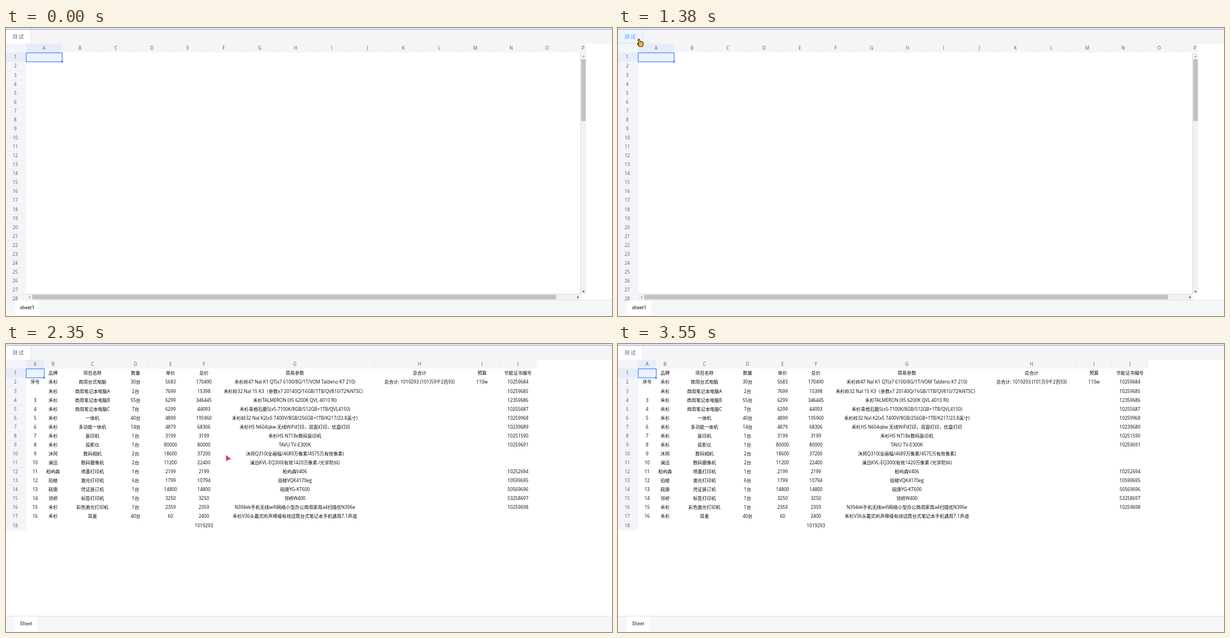
Recreate the animation shown at these times as an HTML page. Size 1084 by 517 pixels, loop 3990 ms.

```html
<!DOCTYPE html>
<html lang="zh-CN">
<head>
<meta charset="utf-8">
<title>Spreadsheet</title>
<style>
  html, body { margin: 0; width: 100%; height: 100%; overflow: hidden; background: #fff; }
  svg { display: block; width: 1084px; height: 517px; }
  text { font: 8.2px "Open Sans", "Noto Sans", "Noto Sans CJK SC", "Noto Sans CJK", sans-serif; fill: #0a0a0a; text-anchor: middle; }
  .head text { fill: #585757; }
  .tab { font: 700 8.4px Roboto, sans-serif; fill: #585757; text-anchor: start; }
  .btn { font: 500 9px "Noto Sans CJK SC", "Noto Sans CJK", sans-serif; fill: #606266; }
  .on .btn { fill: #409eff; }
  .crisp { shape-rendering: crispEdges; }

  .blank, .table, .on, .arrow, .hand, .grip { animation: 3990ms step-end infinite; }
  .blank { animation-name: blank; }
  .table { animation-name: table; }
  .on { animation-name: hover; }
  .arrow { animation-name: arrow; }
  .hand { animation-name: hand; }
  .grip { animation-name: grip; }
  .cursor { animation: move 3990ms linear infinite; }

  @keyframes blank { 0% { opacity: 1 } 45.11%, 100% { opacity: 0 } }
  @keyframes table { 0% { opacity: 0 } 45.11%, 100% { opacity: 1 } }
  @keyframes hover { 0% { opacity: 0 } 29.3% { opacity: 1 } 47.1%, 100% { opacity: 0 } }
  @keyframes hand { 0% { opacity: 0 } 29.3% { opacity: 1 } 47.1%, 100% { opacity: 0 } }
  @keyframes arrow {
    0% { opacity: 0 } 1.25% { opacity: 1 } 29.3% { opacity: 0 }
    47.1% { opacity: 1 } 88.97%, 100% { opacity: 0 }
  }
  @keyframes grip {
    0% { opacity: 0 } 27.3% { opacity: 1 } 28.4% { opacity: 0 }
    47.6% { opacity: 1 } 50.3%, 100% { opacity: 0 }
  }
  @keyframes move {
    0%, 1.25% { transform: translate(1053px, 507px) }
    3.76% { transform: translate(880px, 459px) }
    5.01% { transform: translate(764px, 422px) }
    6.27% { transform: translate(686px, 398px) }
    7.77% { transform: translate(606px, 373px) }
    8.52% { transform: translate(559px, 357px) }
    10.03% { transform: translate(478px, 326px) }
    11.78% { transform: translate(366px, 270px) }
    14.04% { transform: translate(256px, 212px) }
    17.04% { transform: translate(200px, 174px) }
    19.55% { transform: translate(150px, 142px) }
    22.56% { transform: translate(103px, 95px) }
    25.06% { transform: translate(63px, 53px) }
    27.57% { transform: translate(50px, 33px) }
    29.57% { transform: translate(38px, 23px) }
    32.6%, 44.6% { transform: translate(34px, 19px) }
    47.1% { transform: translate(44px, 27px) }
    49.37% { transform: translate(61px, 37px) }
    51.63% { transform: translate(120px, 70px) }
    54.64% { transform: translate(243px, 139px) }
    68.17% { transform: translate(718px, 330px) }
    68.92% { transform: translate(751px, 340px) }
    81.95% { transform: translate(996px, 461px) }
    88.97%, 100% { transform: translate(1046px, 512px) }
  }
</style>
</head>
<body>
<svg viewBox="0 0 1084 517" id="stage">
  <defs>
    <clipPath id="frame"><rect y="28" width="1038" height="461"/></clipPath>
  </defs>
  <rect width="1084" height="517" fill="#fff"/>
  <g class="crisp">
    <rect width="1084" height="2" fill="#e9ebfa"/>
    <rect y="3" width="1084" height="25" fill="#f5f5f5"/>
    <rect y="2" width="1084" height="1" fill="#979dd6"/>
    <rect y="3" width="44" height="25" fill="#fff"/>
    <rect x="44" y="3" width="1" height="25" fill="#e4e5e8"/>
    <rect y="489" width="1084" height="28" fill="#f5f6f7"/>
    <rect y="488" width="1084" height="1" fill="#e0e2e4"/>
  </g>
  <text class="btn" x="21.5" y="18.8">测 试</text>
  <g class="on">
    <rect y="3" width="44.5" height="25" fill="#ecf5ff"/>
    <path d="M0 27.5H44.5V3" fill="none" stroke="#c6e2ff"/>
    <text class="btn" x="21.5" y="18.8">测 试</text>
  </g>
  <g class="blank" id="blank" clip-path="url(#frame)"></g>
  <g class="table" id="table"></g>
  <g class="blank">
    <rect x="16.5" y="489" width="43" height="26.5" fill="#fff"/>
    <text class="tab" x="25" y="505">sheet1</text>
  </g>
  <g class="table">
    <rect x="16.5" y="489" width="39" height="26.5" fill="#fff"/>
    <text class="tab" x="25" y="505" style="font-weight:500;font-size:8.6px">Sheet</text>
  </g>
  <g class="cursor">
    <path class="arrow" d="M.5 .5L9 7.2L4.6 7.6L.8 11Z" fill="#d0393f" stroke="#9c2f38" stroke-width=".5"/>
    <path class="hand" d="M2.2 1.2C3.2 .3 4.3 1 4.6 2L5.6 5.6C6.3 5 7.2 5.2 7.5 5.9C8.3 5.4 9.1 5.7 9.4 6.4C10.3 6.1 10.9 6.6 11 7.5L11 11.2L9.8 14.2L4.4 14.5L.9 10.2C.2 9.2 1.2 8.3 2.2 8.8L3.2 9.6L1.7 3C1.5 2.2 1.7 1.6 2.2 1.2Z" fill="#f5b32d" stroke="#2a2114" stroke-width="1.1" stroke-linejoin="round"/>
  </g>
</svg>
<script>
const TOP = 28.3, ROW = 16.07, LEFT = 36;
const rowY = r => TOP + ROW * r;

function add(parent, tag, attrs, content) {
  const el = document.createElementNS("http://www.w3.org/2000/svg", tag);
  for (const k in attrs) el.setAttribute(k, attrs[k]);
  if (content !== undefined) el.textContent = content;
  parent.appendChild(el);
  return el;
}
const box = (g, x, y, width, height, fill, more) => add(g, "rect", { x, y, width, height, fill, ...more });
const label = (g, x, row, s) => add(g, "text", { x, y: rowY(row) + 11 }, s);

// Column and row headings, plus the selected first cell.
function drawSheet(g, edges, rows, bottom) {
  const right = edges[edges.length - 1], x1 = edges[1];
  const bars = add(g, "g", { class: "crisp" });
  box(bars, 0, 28, right, 16, "#f4f5f8");
  box(bars, 0, 28, LEFT, bottom - 28, "#f4f5f8");
  box(bars, LEFT, 28, x1 - LEFT, 16, "#e7ecfa");
  box(bars, 0, 44, LEFT, 16, "#e7ecfa");
  const head = add(g, "g", { class: "head" });
  for (let i = 0; i + 1 < edges.length; i++) {
    if (i) box(bars, Math.round(edges[i]) - 1, 28, 1, 16, "#eceef1");
    label(head, (edges[i] + edges[i + 1]) / 2, 0, String.fromCharCode(65 + i));
  }
  for (let r = 1; r <= rows; r++) {
    box(bars, 0, Math.round(rowY(r)), LEFT, 1, "#ebedf0");
    label(head, 16.5, r, r);
  }
  box(g, x1 - 4, 28, 4, 16, "#4b89ff", { class: "grip", "fill-opacity": .3 });
  box(g, 36.2, 44.6, x1 - 36, 16, "#4b89ff", { "fill-opacity": .1, stroke: "#4b89ff", "stroke-width": 1.3 });
  box(g, x1 - 2.4, 58.2, 4.2, 4.2, "#4b89ff", { stroke: "#fff", "stroke-width": .6 });
}

const blank = document.getElementById("blank");
drawSheet(blank, Array.from({ length: 17 }, (_, i) => LEFT + 64.27 * i), 28, 489);

const bars = add(blank, "g", { class: "crisp" });
box(bars, 1027, 45, 11, 433, "#f1f1f1");
box(bars, 1027, 45, 1, 433, "#dcdcdc");
box(bars, 1029, 56, 8, 111, "#c1c1c1");
box(bars, 36, 478, 992, 10, "#f1f1f1");
box(bars, 36, 477, 992, 1, "#dcdcdc");
box(bars, 47, 479, 937, 8, "#c1c1c1");
[["M1030.5 52.3h5l-2.5-2.8z", "#a3a3a3"], ["M1030.5 472h5l-2.5 2.8z", "#505050"],
 ["M43.3 480.7v5l-2.8-2.5z", "#a3a3a3"], ["M1022 480.7v5l2.8-2.5z", "#505050"]]
  .forEach(([d, fill]) => add(blank, "path", { d, fill }));

const edges = [36, 68.2, 100.3, 209, 254.5, 334, 374, 659.5, 820, 883, 948.5];
const lines = `|品牌|项目名称|数量|单价|总价|简易参数|总合计|预算|节能证书编号
序号|禾杉|商用台式电脑|30台|5683|170490|禾杉岭47 Nal K1 QT(x7 6100/8G/1T/VOM Taldeno K7 210)|总合计: 1019293 (101万9千2百93)|110w|10259684
|禾杉|商用笔记本电脑A|2台|7699|15398|禾杉岭32 Nal 15 K3（参数x7 20140Q/16GB/1TB/QV810/72%NTSC）|||10259685
3|禾杉|商用笔记本电脑B|55台|6299|346445|禾杉TALMERON (X5 6200K QVL 4010 RI)|||12359686
4|禾杉|商用笔记本电脑C|7台|6299|44093|禾杉青梧石鹿5(x5-7100K/8GB/512GB+1TB/QVL4150)|||10255687
5|禾杉|一体机|40台|4899|195960|禾杉岭32 Nal K2(x5 7400V/8GB/256GB+1TB/K217/23.8英寸)|||10259968
6|禾杉|多功能一体机|14台|4879|68306|禾杉HS N604qkw 无线WiFi打印，双面打印，优盘打印|||10239689
7|禾杉|复印机|1台|3199|3199|禾杉HS N718e数码复印机|||10251590
8|禾杉|投影仪|1台|80000|80000|TAVU TV-E300K|||10259691
9|沐珂|数码相机|2台|18600|37200|沐珂Q310(全画幅/4689万像素/4575万有效像素)
10|澜迅|数码摄像机|2台|11200|22400|澜迅KVL-EQ300(有效1420万像素 /光学防抖)
11|柏屿森|喷墨打印机|1台|2199|2199|柏屿森V406|||10252694
12|珀棱|激光打印机|6台|1799|10794|珀棱VQK4170eg|||10599695
13|砚庚|凭证装订机|1台|14800|14800|砚庚YG-KT600|||50569696
14|邻桥|标签打印机|1台|3250|3250|邻桥W400|||53258697
15|禾杉|彩色激光打印机|1台|2359|2359|N394ek手机无线wifi网络小型办公商用家用a4扫描优N396e|||10259698
16|禾杉|耳麦|40台|60|2400|禾杉V36头戴式听声降噪有线话筒台式笔记本手机通用7.1声道
|||||1019293`.split("\n");

const table = document.getElementById("table");
drawSheet(table, edges, lines.length, 334);
lines.forEach((line, r) => line.split("|").forEach((s, c) => {
  if (s) label(table, (edges[c] + edges[c + 1]) / 2, r + 1, s);
}));
</script>
</body>
</html>
```
